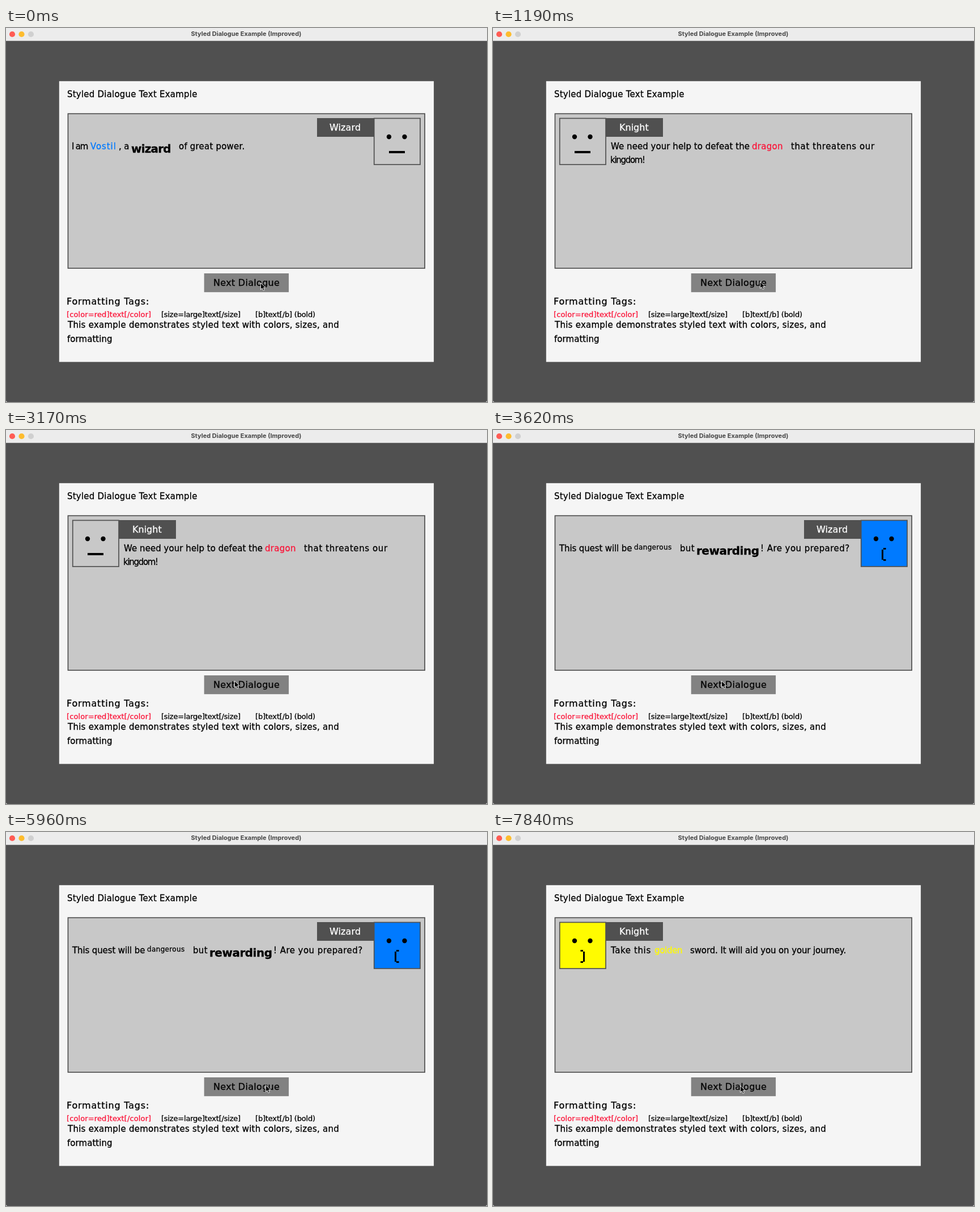
Write an HTML page that moves like this. It is 849x660 px and loops after 8 s.

```html
<!DOCTYPE html>
<html lang="en">
<head>
<meta charset="utf-8">
<title>Styled Dialogue Example</title>
<style>
  html, body { margin: 0; width: 100%; height: 100%; overflow: hidden; background: #fff; }
  svg { display: block; width: 849px; height: 660px; border-radius: 0 0 3px 3px; }
  text { font-family: "DejaVu Sans", sans-serif; white-space: pre; stroke-width: .3px; }
  .title { font: 700 11px Inter, sans-serif; fill: #474747; text-anchor: middle; }
</style>
</head>
<body>
<svg id="stage" viewBox="0 0 849 660" xmlns="http://www.w3.org/2000/svg"></svg>
<script>
const LOOP = 8000, STEP = 90, LINE = 1.7;
const DARK = '#505050', BOX = '#c8c8c8', RED = '#fb1539', BLUE = '#007aff', YELLOW = '#fffb00';

const rect = (x, y, w, h, fill) => `<rect x="${x}" y="${y}" width="${w}" height="${h}" fill="${fill}"/>`;
const dot = (x, y, r, fill) => `<circle cx="${x}" cy="${y}" r="${r}" fill="${fill}"/>`;
const framed = (x, y, w, h, fill) =>
  rect(x, y, w, h, DARK) + rect(x + LINE, y + LINE, w - 2 * LINE, h - 2 * LINE, fill);

function text(str, x, y, spacing = 0, { size = 15, fill = '#000', weight = 400 } = {}) {
  return `<text x="${x}" y="${y}" font-size="${size}" font-weight="${weight}" fill="${fill}" stroke="${fill}" letter-spacing="${spacing}">${str}</text>`;
}

const bracket = (bar, hook) => rect(bar, 211, 3, 18, '#000')
  + rect(hook, 208, 4.5, 3, '#000') + rect(hook, 228, 4.5, 3, '#000');
const mouths = {
  flat: x => rect(x - 14, 217, 28, 4, '#000'),
  sad: x => bracket(x - 4, x - 1),
  glad: x => bracket(x + 1, x - 3.5)
};

function speaker(name, fill, mouth) {
  const right = name === 'Wizard';
  const x = right ? 649 : 117;
  const mid = x + 41;
  return rect(right ? 549 : 199, 159, 101, 33, DARK)
    + text(name, right ? 571 : 223, 181, right ? .1 : 0, { size: 16, fill: '#fff' })
    + framed(x - .1, 158.6, 83, 83.2, fill)
    + dot(mid - 14, 192, 4.2, '#000') + dot(mid + 13.5, 192, 4.2, '#000')
    + mouths[mouth](mid);
}

const large = { size: 20, weight: 700 };
const scenes = [
  { from: 0, art: speaker('Wizard', BOX, 'flat')
    + text('I am', 116, 214, -1.2)
    + text('Vostil', 149, 214, .9, { fill: BLUE })
    + text(', a', 199, 214, -.2)
    + text('wizard', 221, 220, -.8, large)
    + text('of great power.', 305, 214, .2) },
  { from: 1190, art: speaker('Knight', BOX, 'flat')
    + text('We need your help to defeat the', 208, 214, .05)
    + text('dragon', 457, 214, .3, { fill: RED })
    + text('that threatens our', 526, 214, .6)
    + text('kingdom!', 207, 238, -1.3) },
  { from: 3620, art: speaker('Wizard', BLUE, 'sad')
    + text('This quest will be', 117, 214, -.12)
    + text('dangerous', 249, 211, .35, { size: 12 })
    + text('but', 330, 214, .3)
    + text('rewarding', 359, 220, -.5, large)
    + text('! Are you prepared?', 472, 214, .45) },
  { from: 6410, art: speaker('Knight', YELLOW, 'glad')
    + text('Take this', 208, 214, .6)
    + text('golden', 285, 214, -.3, { fill: YELLOW })
    + text('sword. It will aid you on your journey.', 348, 214, -.12) }
];

// Pointer tip: [time, x, y]
const path = [
  [30, 449, 449], [300, 455, 454], [600, 465, 452], [920, 471, 447],
  [1640, 471, 447], [1730, 470, 447],
  [2000, 470, 447], [2090, 465, 448], [2270, 440, 444], [2810, 411, 442], [3170, 403, 442],
  [5150, 403, 442], [5240, 407, 442], [5960, 458, 446],
  [6140, 458, 446], [6230, 461, 445],
  [6680, 461, 445], [7130, 452, 460], [7570, 436, 444],
  [7660, 436, 444], [7840, 436, 447]
];

function pointerAt(t) {
  const base = t < 920 ? 120 : t < 7570 ? 920 : 7570;
  const s = base + Math.floor((t - base) / STEP) * STEP;
  const i = path.findIndex(p => p[0] > s);
  if (i === 0) return path[0].slice(1);
  if (i < 0) return path[path.length - 1].slice(1);
  const [t0, x0, y0] = path[i - 1], [t1, x1, y1] = path[i];
  const k = (s - t0) / (t1 - t0);
  return [Math.round(x0 + (x1 - x0) * k), Math.round(y0 + (y1 - y0) * k)];
}

const small = { size: 13 };
const stage = document.getElementById('stage');
stage.innerHTML =
  rect(0, 0, 849, 660, DARK)
  + rect(0, 0, 849, 22, '#ececec') + rect(0, 22, 849, 1, '#c4c4c4')
  + dot(11, 11, 5.1, '#ff5c54') + dot(27.5, 11, 5.1, '#fdbc2e') + dot(44, 11, 5.1, '#d0d0d0')
  + '<text class="title" x="424" y="14">Styled Dialogue Example (Improved)</text>'
  + rect(93.8, 93.8, 661.3, 495.5, '#f5f5f5')
  + text('Styled Dialogue Text Example', 108, 122, .22)
  + framed(108.6, 150.4, 631.4, 274.4, BOX)
  + '<g id="scene"></g>'
  + rect(349.7, 433, 149.4, 33.2, '#828282')
  + text('Next Dialogue', 366, 455, .3, { size: 16 })
  + text('Formatting Tags:', 107, 488, .8, { size: 16 })
  + text('[color=red]text[/color]', 107, 510, .12, { size: 13, fill: RED })
  + text('[size=large]text[/size]', 274, 510, -.2, small)
  + text('[b]text[/b] (bold)', 440, 510, -.18, small)
  + text('This example demonstrates styled text with colors, sizes, and', 109, 529, .25)
  + text('formatting', 108, 554, .05)
  + '<path id="pointer" d="M.5.8V12.6L3.2 10.1 5.1 14.4 7.2 13.5 5.4 9.3H9Z" fill="#000" stroke="#fff" stroke-width=".9"/>';

const sceneEl = document.getElementById('scene');
const pointer = document.getElementById('pointer');
let shown = null;

function draw(t) {
  const scene = scenes.filter(s => s.from <= t).pop();
  if (scene !== shown) {
    sceneEl.innerHTML = scene.art;
    shown = scene;
  }
  pointer.setAttribute('transform', `translate(${pointerAt(t)})`);
}

const start = performance.now();
function tick() {
  draw((performance.now() - start) % LOOP);
  requestAnimationFrame(tick);
}
tick();
</script>
</body>
</html>
```
